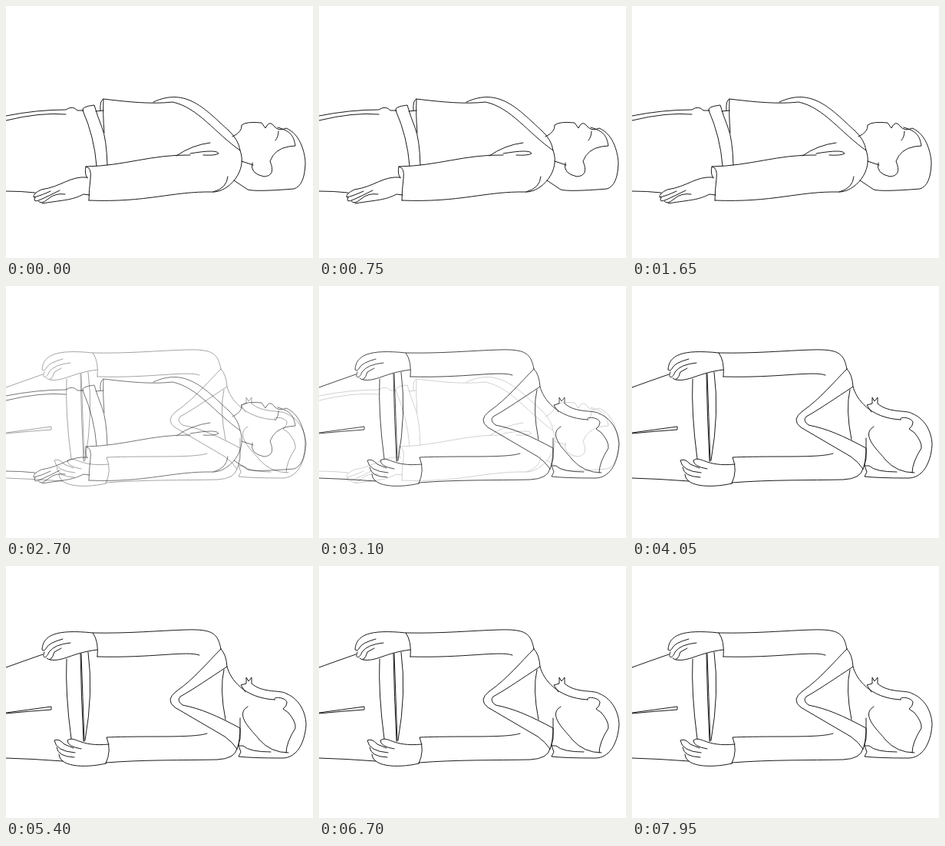
An HTML page for the animation above (8 s loop, 400x328 px).

```html
<!DOCTYPE html>
<html lang="en">
<meta charset="utf-8">
<title>Resting figure</title>
<style>
  html, body { margin: 0; width: 100%; height: 100%; overflow: hidden; background: #fff; }
  svg { display: block; width: 100vw; height: 100vh; }
  path { fill: none; stroke: #000; stroke-width: .9; stroke-linecap: round; stroke-linejoin: round; }
</style>
<svg viewBox="0 0 400 328">
  <g id="back">
    <!-- legs and belt -->
    <path d="M0,143Q40,135 78,135Q87,129 93,136H101M0,149Q45,138 78,141M0,241Q20,241 38,243"/>
    <path d="M118,208Q115,170 100,136Q98,131 115,129Q119,143 125,158T132,207M117,137L127,136"/>
    <!-- jacket -->
    <path d="M123,136Q122,123 127,121Q126,140 128,165"/>
    <path d="M127,121C160,125 190,128 217,125C250,132 272,165 305,188"/>
    <path d="M192,125C235,105 260,135 290,162Q303,174 305,188C315,215 290,242 270,242C215,241 185,256 108,253"/>
    <!-- sleeve -->
    <path d="M289,222Q288,237 270,242M222,195Q242,181 266,178M240,192Q275,186 277,192Q272,195 257,194"/>
    <path d="M240,194C190,193 155,208 104,209Q102,219 106,224M104,209Q112,210 110,225T108,253"/>
    <!-- hand -->
    <path d="M106,223C83,221 73,235 46,239Q35,244 36,249Q45,247 58,241"/>
    <path d="M38,249Q34,257 45,252T70,240M42,254Q46,259 55,251T77,245M47,257C78,252 85,253 101,245L109,246"/>
    <!-- head -->
    <path d="M295,170Q308,164 307,155Q313,150 333,152L338,159Q343,148 349,156T365,159C385,167 390,195 390,205Q389,234 375,238Q325,242 315,239L297,227"/>
    <path d="M354,158C372,163 375,170 377,182L368,183Q350,186 344,202Q352,221 336,222Q317,218 321,204"/>
    <path d="M307,202L322,207M355,163Q355,170 351,175"/>
  </g>
  <g id="side">
    <!-- legs and belt -->
    <path d="M0,132Q22,124 48,115M0,191Q30,187 59,183V187Q30,189 0,192M0,250Q35,251 74,254"/>
    <path d="M79,121Q77,165 85,225M97,114Q98,170 101,228M98,114Q100,170 102,228M107,112Q114,165 103,227"/>
    <!-- upper arm and hand -->
    <path d="M119,118Q121,98 113,87C160,88 200,84 235,83S276,88 280,108M119,118C190,120 235,110 252,116"/>
    <path d="M113,87C65,82 48,90 47,109Q50,112 53,106T74,95M50,112C46,121 53,121 56,112Q63,102 84,100"/>
    <path d="M53,120Q59,126 63,112L72,107M57,122C75,125 85,113 119,109"/>
    <!-- lower arm and hand -->
    <path d="M88,237L76,232Q69,224 63,227Q65,241 90,243M66,236Q67,248 89,249M69,245C70,264 110,262 130,257"/>
    <path d="M98,238Q80,235 80,227C90,220 95,236 134,232"/>
    <path d="M130,257Q138,240 131,223Q150,222 200,222C245,222 255,220 262,218M130,256C180,252 230,253 275,252Q298,251 301,238"/>
    <!-- lapels and neck -->
    <path d="M280,108C262,126 245,147 222,163Q207,174 220,184L285,222Q295,229 301,238"/>
    <path d="M280,108Q287,115 288,131C265,146 245,160 227,170Q222,175 230,181C255,186 275,195 305,211V225L301,238"/>
    <path d="M288,131C292,147 310,172 350,174M284,135Q278,160 286,200"/>
    <!-- head -->
    <path d="M312,164L306,155 313,153V145L316,150 320,145V153C335,166 358,161 365,166C385,174 391,195 391,207C389,232 378,250 360,250Q320,250 303,248L306,242 303,234 305,217V198"/>
    <path d="M350,174C347,169 366,171 366,178Q366,182 361,186L368,191Q378,203 377,211Q365,230 365,243"/>
    <path d="M315,183C296,194 323,216 330,226Q345,243 368,243M303,234H309Q317,242 345,242"/>
  </g>
</svg>
<script>
const back = document.getElementById('back');
const side = document.getElementById('side');
const LOOP = 8000, FADE_START = 2300, FADE_TIME = 1000;

function frame() {
  const t = performance.now() % LOOP;
  const p = Math.max(0, Math.min(1, (t - FADE_START) / FADE_TIME));
  back.style.opacity = 1 - p;
  side.style.opacity = p;
  requestAnimationFrame(frame);
}
frame();
</script>
</html>
```
